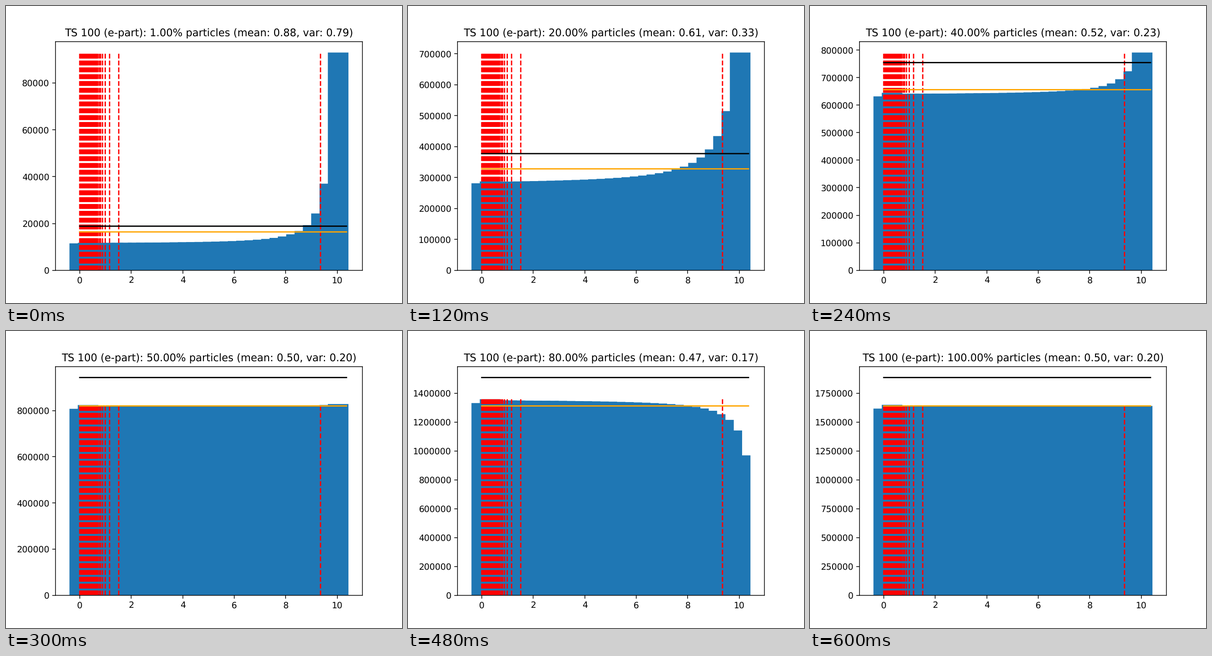
A matplotlib script for the animation above (0.63 s loop, 864 px wide and 648 px high).

```python
import numpy as np
import matplotlib.pyplot as plt
from matplotlib.animation import FuncAnimation

# Soft, unsnapped edges and unhinted glyphs
plt.rcParams.update({"path.snap": False, "text.hinting": "none"})

BARS = 32
STEP = 0.3238
PER_BIN = 1640e3
LIMIT = 1.15 * PER_BIN
BAR = np.arange(BARS)
SPAN = [0, BARS * STEP]
EDGES = np.concatenate([np.linspace(0, 0.7, 25),
                        1.515 * np.arange(1, 7) ** -0.387,
                        [9.352]])

# Key points over the sample size in percent
PERCENTS = [1, 20, 30, 50, 70, 90]
LAST_BAR = [5.67, 2.146, 1.458, 1.01, 0.806, 0.68]
MEANS = [0.88, 0.61, 0.54, 0.50, 0.48, 0.47]
VARS = [0.79, 0.33, 0.26, 0.20, 0.18, 0.16]


def at(percent, values):
    return np.interp(np.log(percent), np.log(PERCENTS), values)


def shares(percent, last):
    """Bar heights relative to an even share: a power-law tail, average 1."""
    wide = min(1, percent / 20)
    rank = BARS - BAR
    tail = ((1 + wide) / (rank + wide)) ** (1.75 - 0.3 * wide)
    tail -= tail.mean()
    share = 1 + (last - 1) * tail / tail[-1]
    share[:2] *= 0.986, 1.006
    return share


def sample(percent):
    if percent == 100:
        return shares(percent, 1), 0.50, 0.20
    last, mean, var = (at(percent, v) for v in (LAST_BAR, MEANS, VARS))
    return shares(percent, last), mean, var


fig, ax = plt.subplots(figsize=(6.4, 4.8), dpi=135)


def draw(frame):
    percent = max(1, 5 * frame)
    part = percent / 100
    share, mean, var = sample(percent)
    heights = share * PER_BIN * part

    ax.clear()
    ax.bar(STEP * BAR, heights, width=0.8, color="tab:blue")
    for x in EDGES:
        ax.plot([x, x], [0, heights.max()], "r--")
    for level, color in ((LIMIT, "black"), (PER_BIN, "orange")):
        ax.plot(SPAN, [level * part] * 2, color=color)
    ax.ticklabel_format(axis="y", style="plain", useOffset=False)
    ax.set_title(f"TS 100 (e-part): {percent:.2f}% particles "
                 f"(mean: {mean:.2f}, var: {var:.2f})")


anim = FuncAnimation(fig, draw, frames=21, interval=30, repeat=True,
                     repeat_delay=0)
plt.show()
```
